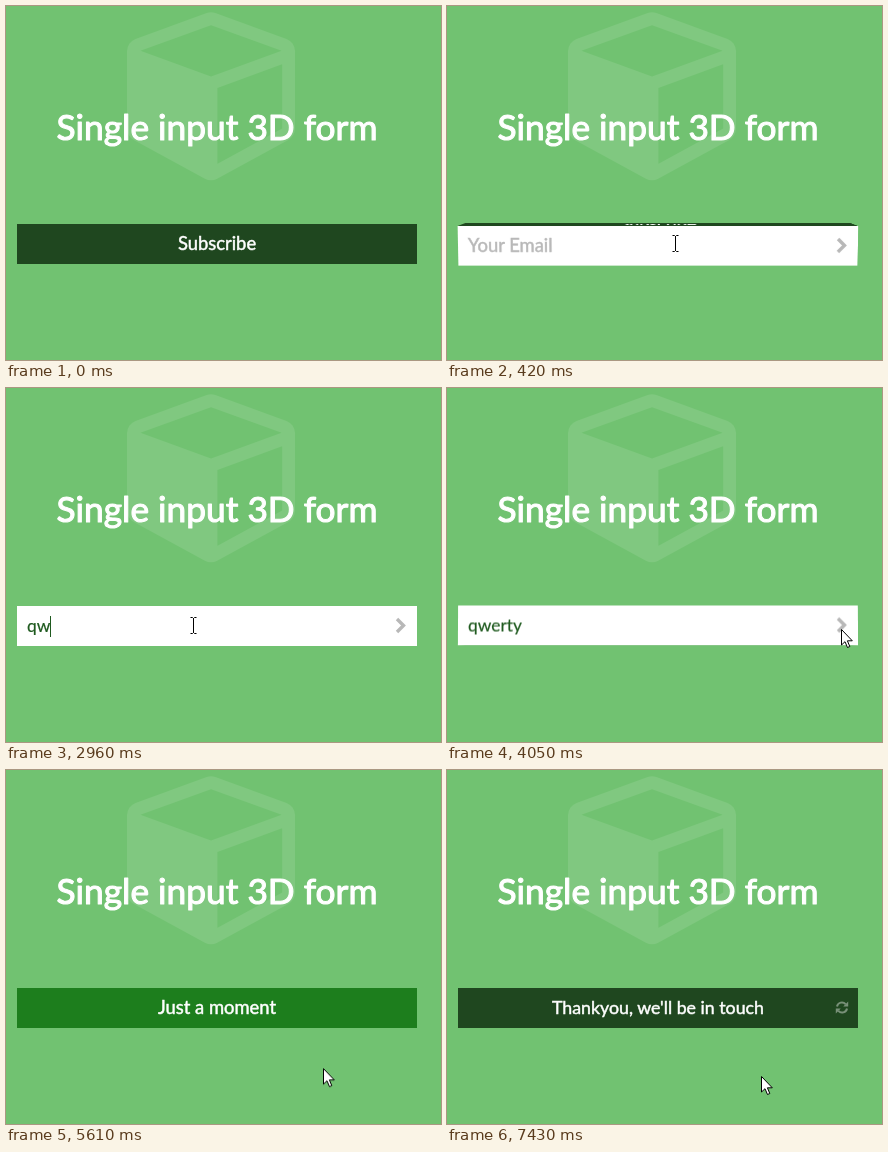
Animation, 435 px wide and 354 px high, one loop 8 s. Source, as an HTML page:

```html
<!DOCTYPE html>
<html lang="en">
<head>
<meta charset="utf-8">
<title>Single input 3D form</title>
<style>
html, body { margin: 0; width: 100%; height: 100%; overflow: hidden; background: #71c271; }
body { position: relative; font: 18.4px/38px Lato, "Open Sans", sans-serif; color: #fff; }
svg { position: absolute; left: 0; top: 0; overflow: visible; }
.title { font-size: 35.3px; fill: #fff; stroke: #fff; stroke-width: 1.1; stroke-linejoin: round; text-anchor: middle; }

/* Box with four faces, a quarter turn apart */
.scene { position: absolute; left: 11px; top: 218px; width: 400px; height: 40px; perspective: 1000px; }
.box, .face { position: absolute; inset: 0; }
.box { transform-style: preserve-3d; animation: turn 8s ease infinite; }
.face {
  transform: rotateX(calc(var(--i) * -90deg)) translateZ(20px);
  backface-visibility: hidden;
  text-align: center; white-space: nowrap;
  background: #1f471f;
  -webkit-text-stroke: .5px;
}
.email { --i: 1; background: #fff; text-align: left; color: #b8b8b8; }
.wait { --i: 2; background: #1d7e1d; animation: fade 8s linear infinite; }
.done { --i: 3; font-size: 17.8px; }
.hint, .typed { position: absolute; left: 10px; top: 0; height: 38px; }
.hint { animation: hint 8s step-end infinite; }
.typed { color: #1f5a1f; -webkit-text-stroke: .2px; }
.typed b { font-weight: 400; font-size: 0; animation: key 8s step-end calc(var(--n) * 70ms) infinite backwards; }
.caret { position: absolute; left: 100%; top: 10px; width: 1px; height: 21px; background: #1f5a1f; animation: caret 8s step-end infinite; }

.mouse { position: absolute; left: 0; top: 0; animation: move 8s linear infinite; }
.arrow { animation: arrow 8s step-end infinite; }
.beam { animation: beam 8s step-end infinite; }

@keyframes turn {
  0%, 1.975% { transform: translateZ(-20px) rotateX(0deg); }
  6.725%, 50.5% { transform: translateZ(-20px) rotateX(90deg); }
  55.25%, 88.325% { transform: translateZ(-20px) rotateX(180deg); }
  93.075%, 100% { transform: translateZ(-20px) rotateX(270deg); }
}
@keyframes fade {
  0%, 88.325% { background: #1d7e1d; }
  88.75% { background: #297229; }
  93.075%, 100% { background: #1f471f; }
}
@keyframes hint {
  0%, 80% { visibility: visible; }
  36.95% { visibility: hidden; }
}
@keyframes key {
  0%, 80%, 100% { font-size: 0; }
  36.95% { font-size: 17.4px; }
}
@keyframes caret {
  0%, 19.1%, 50% { visibility: hidden; }
  13.1%, 26.5% { visibility: visible; }
}
@keyframes move {
  0%, .6% { transform: translate(232px, 322px); }
  1.6% { transform: translate(231px, 262px); }
  2.5%, 11.1% { transform: translate(228px, 237px); }
  13.5%, 17.6% { transform: translate(191px, 237px); }
  19.1%, 42% { transform: translate(187px, 237px); animation-timing-function: ease-in-out; }
  46.5%, 56.3% { transform: translate(394px, 241px); }
  59.5%, 61.2% { transform: translate(365px, 248px); }
  65% { transform: translate(348px, 264px); }
  68% { transform: translate(326px, 284px); }
  70.1% { transform: translate(317px, 298px); }
  71%, 71.6% { transform: translate(316px, 302px); }
  79%, 100% { transform: translate(314px, 306px); }
}
@keyframes arrow {
  0%, 2.3% { visibility: hidden; }
  .6%, 45.8%, 100% { visibility: visible; }
}
@keyframes beam {
  0%, 45.8%, 100% { visibility: hidden; }
  2.3% { visibility: visible; }
}
</style>
</head>
<body>
<svg width="435" height="354">
  <path fill="#fff" fill-opacity=".1" fill-rule="evenodd" transform="translate(121 -6.700) scale(.101)" d="M896 1629l640-349v-636l-640 233zM832 764l698-254-698-254-698 254zM1664 512v768q0 35-18 65t-49 47l-704 384q-28 16-61 16t-61-16l-704-384q-31-17-49-47t-18-65v-768q0-40 23-73t61-47l704-256q22-8 44-8t44 8l704 256q38 14 61 47t23 73z"/>
  <text class="title" x="211" y="133.500">Single input 3D form</text>
</svg>

<div class="scene">
  <div class="box">
    <div class="face" style="--i:0">Subscribe</div>
    <div class="face email">
      <span class="hint">Your Email</span>
      <span class="typed"><b style="--n:0">q</b><b style="--n:0">w</b><b style="--n:1">e</b><b style="--n:2">r</b><b style="--n:3">t</b><b style="--n:4">y</b><i class="caret"></i></span>
      <svg width="400" height="40"><path d="M380 13L386.500 19.500 380 26" fill="none" stroke="#b8b8b8" stroke-width="3.4"/></svg>
    </div>
    <div class="face wait">Just a moment</div>
    <div class="face done">Thankyou, we'll be in touch
      <svg width="400" height="40">
        <g opacity=".4" transform="translate(384 19.5)">
          <path d="M-5 -1A5 5 0 0 1 3.600 -3.400M5 1A5 5 0 0 1 -3.600 3.400" fill="none" stroke="#fff" stroke-width="2"/>
          <path d="M6.200 -6V-1H1.200ZM-6.200 6V1H-1.200Z" fill="#fff"/>
        </g>
      </svg>
    </div>
  </div>
</div>

<div class="mouse">
  <svg width="1" height="1">
    <path class="arrow" d="M.5 .5V16L4 12.700 6.500 18.500 8.800 17.500 6.400 11.800H11.300Z" fill="#fff" stroke="#000"/>
    <path class="beam" d="M-2.500 -7.500H-.5L.5 -6.500 1.500 -7.500H3.500M.5 -7V8M-2.500 8.500H-.5L.5 7.500 1.500 8.500H3.500" fill="none" stroke="#000"/>
  </svg>
</div>
</body>
</html>
```
